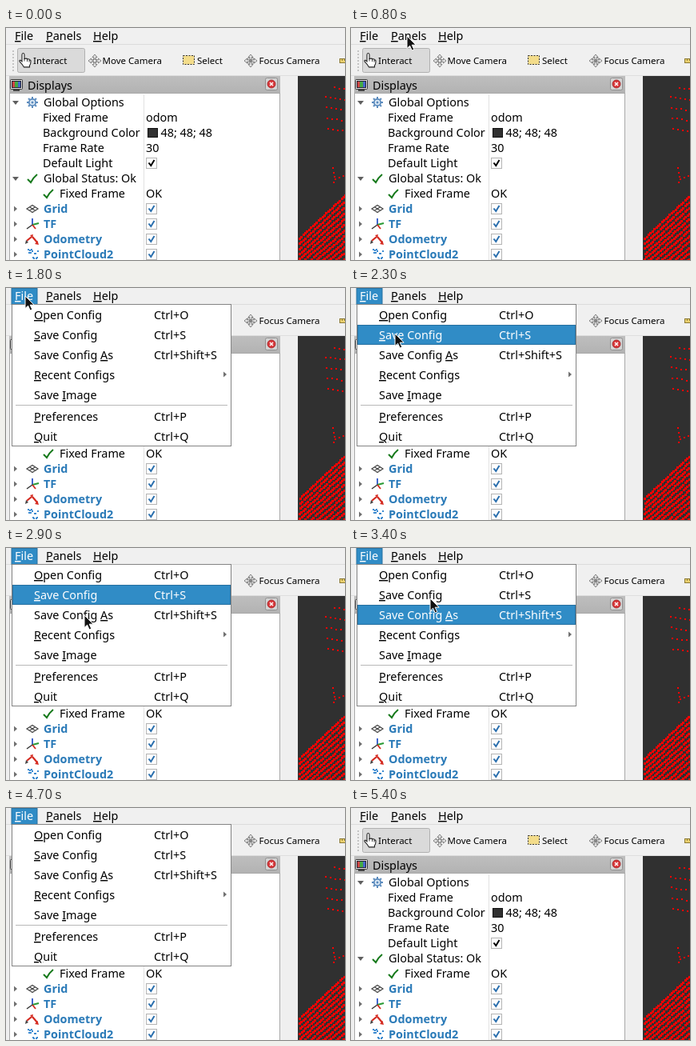
An HTML page for the animation above (5.5 s loop, 424x290 px).

```html
<!DOCTYPE html>
<html lang="en">
<head>
<meta charset="utf-8">
<title>Panels and config menus</title>
<style>
html, body { margin: 0; width: 100%; height: 100%; overflow: hidden; background: #efefef; }
svg { display: block; width: 424px; height: 290px; }
text { font: 14.4px "Noto Sans", "Open Sans", sans-serif; fill: #000; white-space: pre; }
.tool { font-size: 11.5px; }
.name { font-weight: 700; fill: #2a7ab8; }
.u { text-decoration: underline; text-decoration-thickness: 1px; }
.on text { fill: #fff; }
</style>
</head>
<body>
<svg id="stage" viewBox="0 0 424 290" xmlns="http://www.w3.org/2000/svg"></svg>
<script>
const LOOP = 5500, TICK = 100;
const HOLDS = [200, 500, 1700, 3500, 4000, 4600, 4900];
const stage = document.getElementById('stage');

// An ampersand marks the underlined letter.
const label = (x, y, s, cls = '') =>
  `<text x="${x}" y="${y}" class="${cls}">${s.replace(/&(.)/, '<tspan class="u">$1</tspan>')}</text>`;
const rect = (x, y, w, h, fill, more = '') =>
  `<rect x="${x}" y="${y}" width="${w}" height="${h}" fill="${fill}" ${more}/>`;
const frame = (x, y, w, h, fill, stroke, more = '') =>
  rect(x + .5, y + .5, w - 1, h - 1, fill, `stroke="${stroke}" ${more}`);
const path = (d, fill, more = '') => `<path d="${d}" fill="${fill}" ${more}/>`;
const line = (d, color, width = 1) =>
  path(d, 'none', `stroke="${color}" stroke-width="${width}"`);
const circle = (x, y, r, fill, stroke = 'none', width = 1) =>
  `<circle cx="${x}" cy="${y}" r="${r}" fill="${fill}" stroke="${stroke}" stroke-width="${width}"/>`;

const highlight = (x, y, w, h) => frame(x, y, w, h, '#308cc6', '#2670a0', 'visibility="hidden"');
const tick = (x, y, color) => line(`M${x + 3.5} ${y + 6.5}l2.8 3.6l4.2 -7`, color, 2);
const box = (x, y, checked, color = '#000') =>
  frame(x, y, 14, 14, '#fff', '#b4b4b4') + (checked ? tick(x, y, color) : '');
const arrowRight = (x, y) => path(`M${x} ${y - 3.5}l4 3.5l-4 3.5z`, '#707070');
const arrowDown = (x, y) => path(`M${x - 4} ${y - 2}h8l-4 5z`, '#606060');
const okMark = (x, y) => line(`M${x} ${y + 1}l4 4q3 -6 8 -10`, '#16791b', 2);

// Four outlined arrows around a centre.
function cross(x, y) {
  let s = '';
  for (let a = 0; a < 360; a += 90)
    s += path(`M${x} ${y - 8}l3 3.5h-1.800v3h-2.400v-3h-1.800z`, '#e6e6e6',
      `stroke="#777" stroke-width=".9" transform="rotate(${a} ${x} ${y})"`);
  return s;
}

function toolbar() {
  let s = rect(0, 0, 424, 60, '#f0f0f0') + rect(0, 20, 424, 1, '#dcdcdc');
  for (let y = 28; y < 55; y += 4) s += rect(8, y, 2, 2, '#c4c4c4');
  s += frame(14, 25, 85, 31, '#dadada', '#b0b0b0', 'rx="2"');
  s += path('M20 33.5q0-2 1.5-2t1.5 2v5q3-1 4 .4q2-.4 2.5 1q1.7 0 1.5 2q0 3-1.5 5v2h-7q-2-3.5-5.5-7q-.6-2 1-1.6l2 1.5z',
    '#fff', 'stroke="#222" stroke-width="1.1"');
  s += line('M23 38v3.5M26.5 39v3M29 40v2.5', '#222', .9);
  s += cross(111, 41) + circle(111, 41, 2.2, '#eee', '#666');
  s += rect(221.5, 34.5, 14, 11, '#f3dc8a', 'stroke="#333" stroke-dasharray="2 1.5"');
  s += circle(306, 41, 4.5, 'none', '#888', 1.2) + cross(306, 41) + circle(306, 41, 1, '#666');
  s += rect(417.5, 38.5, 10, 5, '#ead06e', 'stroke="#8c7a35"') + line('M420.5 39v2M423.5 39v2', '#8c7a35');
  [[34, 'Interact'], [120.5, 'Move Camera'], [239, 'Select'], [316.5, 'Focus Camera']]
    .forEach(([x, t]) => s += label(x, 45, t, 'tool'));
  return s + rect(0, 59, 424, 1, '#dedede');
}

function gear(x, y) {
  let s = circle(x, y, 4.2, '#dce9f5', '#5b8bbd', 1.8);
  for (let a = 0; a < 360; a += 45)
    s += rect(x - 1, y - 7, 2, 2.4, '#5b8bbd', `transform="rotate(${a} ${x} ${y})"`);
  return s + circle(x, y, 1.5, '#5b8bbd');
}

function rowIcons() {
  let s = gear(33, 93) + okMark(27, 188) + okMark(47, 207);
  s += line('M26 226l7-4.5l7 4.5l-7 4.5zM29.5 223.7l7 4.6M36.5 223.7l-7 4.6', '#444', 1.2);
  s += line('M33 246v-8', '#2d55c8', 1.8) + line('M33 246l8-2', '#2a9a35', 2) +
    line('M33 246l-7 5', '#333', 1.4) + line('M33 246l4 5', '#d42a20', 1.8);
  s += line('M26 266l6-5M33 261l6 7', '#d42a20', 2.2) + path('M24 270l1-5l3 3z', '#444') +
    path('M41 271l-5-1l3.5-4z', '#d42a20') + path('M34 258l-4 1l3 3z', '#d42a20');
  for (let i = 0; i < 13; i++)
    s += rect(27 + i, 276 + (i * i * 3 + i) % 13, 2, 2, '#3c8ad0');
  return s;
}

function displays() {
  let s = rect(0, 60, 365, 230, '#efefef');
  s += rect(4, 60, 339, 22, 'url(#head)') + frame(4, 81, 339, 220, '#fff', '#a8a8a8');
  s += frame(5, 64, 16, 13, '#e4e4e4', '#333', 'rx="1"') + rect(7, 66, 12, 9, '#223') +
    rect(8, 67, 3, 7, '#c44') + rect(11, 67, 4, 7, '#4a4') + rect(15, 67, 3, 7, '#46c') +
    rect(9, 77, 8, 2, '#444');
  s += label(27, 77, 'Displays');
  s += frame(324, 62, 16, 16, '#d4d4d4', '#909090', 'rx="2"') +
    circle(332, 70, 5, '#d8373a', '#a02022', .8) + line('M330 68l4 4M334 68l-4 4', '#fff', 1.5);
  s += rect(172, 83, 1, 207, '#e2e2e2');
  [[47, 'Global Options'], [46, 'Fixed Frame', 'odom'], [46, 'Background Color'],
   [46, 'Frame Rate', '30'], [46, 'Default Light', '#000'], [47, 'Global Status: Ok'],
   [67, 'Fixed Frame', 'OK'], [47, 'Grid', '#2a6fae'], [47, 'TF', '#2a6fae'],
   [47, 'Odometry', '#2a6fae'], [47, 'PointCloud2', '#2a6fae']].forEach(([x, t, v], i) => {
    const y = 93 + 19 * i;
    s += label(x, y + 5, t, i > 6 ? 'name' : '');
    if (v && v[0] === '#') s += box(175, y - 7, true, v);
    else if (v) s += label(175, y + 5, v);
    if (i > 6) s += arrowRight(10, y);
  });
  s += arrowDown(12, 93) + arrowDown(12, 188) + rowIcons();
  return s + frame(177, 125, 13, 12, '#303030', '#111') + label(193.5, 136, '48; 48; 48');
}

const menus = {
  panels: { x: 46, w: 213, h: 228, split: 96, textX: 74, keyX: 219, first: 3, barW: 53, items: [
    ['Add &New Panel'], ['&Delete Panel', '>'], ['&Fullscreen', 'F11', 0], ['Tools', '', 1],
    ['Displays', '', 1], ['Selection', '', 0], ['Tool Properties', '', 0], ['Views', '', 0], ['Time', '', 1]] },
  file: { x: 7, w: 275, h: 178, split: 146, textX: 35, keyX: 185, first: 5, barW: 33, items: [
    ['&Open Config', 'Ctrl+O'], ['&Save Config', 'Ctrl+S'], ['Save Config &As', 'Ctrl+Shift+S'],
    ['&Recent Configs', '>'], ['Save &Image'], ['&Preferences', 'Ctrl+P'], ['&Quit', 'Ctrl+Q']] }
};
const midY = (m, i) => 34 + 25 * i + (i >= m.first ? 2 : 0);

function popup(id, m) {
  let s = frame(m.x, 20, m.w, m.h, '#fff', '#848484');
  s += rect(m.x + 5, m.split, m.w - 10, 1, '#b8b8b8');
  m.items.forEach(([t, key, check], i) => {
    const y = midY(m, i);
    s += `<g class="row">${highlight(m.x + 1, y - 13, m.w - 2, 25)}`;
    if (check !== undefined) s += box(54, y - 6, check);
    s += label(m.textX, y + 5, t);
    s += key === '>' ? arrowRight(m.x + m.w - 10, y - 1) : key ? label(m.keyX, y + 5, key) : '';
    s += '</g>';
  });
  return `<g id="${id}">${s}</g>`;
}

const barItem = (id, x, t) => `<g id="${id}Bar">` +
  (menus[id] ? highlight(menus[id].x - .5, 0, menus[id].barW, 21) : '') + label(x, 15, t) + '</g>';

stage.innerHTML =
  `<defs><linearGradient id="head" x2="0" y2="1"><stop stop-color="#bebebe"/><stop offset="1" stop-color="#b2b2b2"/></linearGradient></defs>` +
  toolbar() + displays() + rect(365, 60, 59, 230, '#303030') +
  '<path id="cloud" fill="#f00" shape-rendering="crispEdges"/>' +
  barItem('file', 11, '&File') + barItem('panels', 50, '&Panels') + barItem('help', 109, '&Help') +
  popup('panels', menus.panels) + popup('file', menus.file) +
  path('M0 0v15.5l3.6-3.3l2.6 5.800l2.6-1.200l-2.6-5.600h4.900z', '#111',
    'id="pointer" stroke="#fff" stroke-width="1"');

const get = id => document.getElementById(id);
const cloud = get('cloud'), pointer = get('pointer');
for (const id in menus) {
  menus[id].popup = get(id);
  menus[id].top = get(id + 'Bar');
  menus[id].rows = [...get(id).querySelectorAll('.row')];
}

const noise = (a, b) => {
  const v = Math.sin(a * 12.9898 + b * 78.233) * 43758.5453;
  return v - Math.floor(v);
};

// Scan points: sparse rows above, dense slanted scan lines below.
function cloudPath(seed) {
  let d = '';
  const dot = (x, y, s) => {
    x = Math.round(x); y = Math.round(y);
    if (x >= 365) d += `M${x} ${y}h${s}v${s}h${-s}z`;
  };
  for (let r = 0; r < 5; r++)
    for (let i = r ? 0 : 2; i < 5; i++) {
      const j = noise(seed + i, r) - .5;
      dot(398 + r + i * 6 + j, 72 + 13.3 * r + i * .9 + j, 2);
    }
  [[408, 174], [409, 180], [410, 185], [411, 188], [409, 192], [416, 186], [421, 184]]
    .forEach(([x, y], i) => dot(x + noise(seed, i) - .5, y + noise(i, seed) - .5, 2));
  for (let k = 0; k < 15; k++) {
    const shift = noise(seed, k) - .5, slope = .94 - .012 * k;
    for (let x = 364 + shift; x < 425; x += 2.4) {
      const y = 263 + 6.4 * k - slope * (x - 365) + shift * .5;
      if (y < 290) dot(x, y, 3);
    }
  }
  return d;
}

const track = [
  [600, 6, 2], [800, 70, 10], [900, 76, 14], [1100, 130, 92], [1200, 140, 106], [1300, 138, 93],
  [1400, 104, 50], [1500, 62, 14], [1600, 28, 8], [1800, 24, 10], [2300, 55, 57], [2600, 92, 62],
  [2800, 98, 67], [2900, 98, 84], [3100, 99, 91], [3400, 99, 63], [3600, 98, 80], [3700, 98, 76],
  [3800, 98, 61], [3900, 98, 57], [4100, 124, 58], [4300, 230, 64], [4400, 330, 120], [4500, 426, 180]
];
function pointerAt(t) {
  const n = track.findIndex(k => k[0] > t);
  if (n < 1) return null;
  const [t0, x0, y0] = track[n - 1], [t1, x1, y1] = track[n];
  const f = (t - t0) / (t1 - t0);
  return [x0 + (x1 - x0) * f, y0 + (y1 - y0) * f];
}

function hovered(m, p) {
  if (!p || p[0] < m.x || p[0] > m.x + m.w) return -1;
  return m.items.findIndex((_, i) => p[1] >= midY(m, i) - 13 && p[1] < midY(m, i) + 12);
}

function light(g, on) {
  g.classList.toggle('on', on);
  g.firstElementChild.setAttribute('visibility', on ? 'visible' : 'hidden');
}

let shown = -1;
function draw(ms) {
  let t = Math.floor(ms % LOOP / TICK) * TICK;
  if (HOLDS.includes(t)) t -= TICK;
  if (t === shown) return;
  shown = t;
  cloud.setAttribute('d', cloudPath(t / TICK));
  const open = t >= 900 && t < 1600 ? 'panels' : t >= 1600 && t < 5000 ? 'file' : '';
  // The highlight trails the pointer by one tick.
  const trail = pointerAt(t - TICK);
  for (const id in menus) {
    const m = menus[id], on = id === open, h = hovered(m, trail);
    m.popup.style.display = on ? '' : 'none';
    light(m.top, on);
    m.rows.forEach((g, i) => light(g, on && i === h));
  }
  const p = pointerAt(t);
  pointer.style.display = p ? '' : 'none';
  if (p) pointer.setAttribute('transform', `translate(${Math.round(p[0])} ${Math.round(p[1])})`);
}

const start = performance.now();
function loop() {
  draw(performance.now() - start);
  requestAnimationFrame(loop);
}
loop();
</script>
</body>
</html>
```
